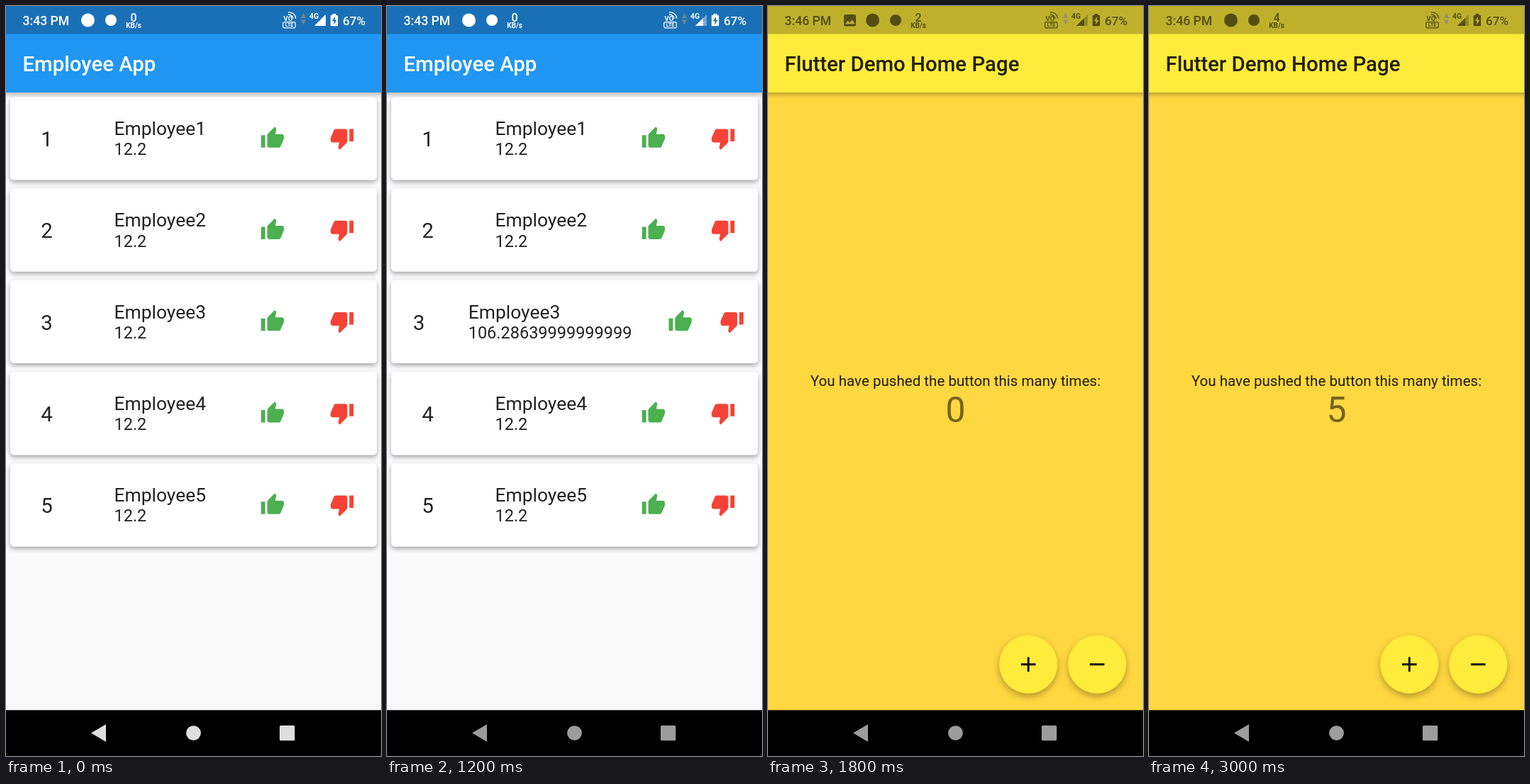
Recreate the animation shown at these times as an HTML page. Size 529 px wide and 1058 px high, loop 3.6 s.

```html
<!DOCTYPE html>
<html lang="en">
<head>
<meta charset="utf-8">
<title>Employee list and counter</title>
<style>
html, body { margin: 0; height: 100%; overflow: hidden; background: #000; }
svg { display: block; width: 529px; height: 1058px; font-family: Roboto, sans-serif; }
.bar { filter: drop-shadow(0 3px 3px rgba(0,0,0,.28)); }
.card { fill: #fff; filter: drop-shadow(0 3px 3px rgba(0,0,0,.34)); }
.fab { fill: #ffeb3b; filter: drop-shadow(0 4px 5px rgba(0,0,0,.3)); }
</style>
</head>
<body>
<svg id="stage" viewBox="0 0 529 1058"></svg>
<script>
const STEP = 600;
const INK = "rgba(0,0,0,.87)";
const THUMB = "M1 21h4V9H1v12zm22-11c0-1.1-.9-2-2-2h-6.31l.95-4.57.03-.32c0-.41-.17-.79-.44-1.06L14.17 1 7.59 7.59C7.22 7.95 7 8.45 7 9v10c0 1.1.9 2 2 2h9c.83 0 1.54-.5 1.84-1.22l3.02-7.05c.09-.23.14-.47.14-.73v-2z";

const blue = { bar: "#2196f3", top: "#1a70b7", body: "#fafafa", ink: "#fff", title: "#fff", name: "Employee App", time: "3:43 PM" };
const yellow = { bar: "#ffeb3b", top: "#bfb02c", body: "#ffd740", ink: "#544d13", title: INK, name: "Flutter Demo Home Page", time: "3:46 PM" };

const states = [
  { look: blue, salary: "12.2", speed: 0, nav: "#dedede", signal: 451 },
  { look: blue, salary: "59.047999999999995", speed: 0 },
  { look: blue, salary: "106.28639999999999", speed: 0 },
  { look: yellow, count: 0, speed: 2, picture: true },
  { look: yellow, count: -4, speed: 0, idle: true },
  { look: yellow, count: 5, speed: 4 },
];

const text = (x, y, size, fill, str, weight = 400, anchor = "start") =>
  `<text x="${x}" y="${y}" font-size="${size}" fill="${fill}" font-weight="${weight}" text-anchor="${anchor}">${str}</text>`;
const rect = (x, y, w, h, fill, r = 0, cls = "") =>
  `<rect x="${x}" y="${y}" width="${w}" height="${h}" rx="${r}" fill="${fill}" class="${cls}"/>`;
const circle = (x, y, r, fill, cls = "") =>
  `<circle cx="${x}" cy="${y}" r="${r}" fill="${fill}" class="${cls}"/>`;
const path = (d, fill, more = "") => `<path d="${d}" fill="${fill}" ${more}/>`;

function thumb(x, y, fill, turn) {
  return path(THUMB, fill, `transform="translate(${x} ${y}) scale(1.469) rotate(${turn}) translate(-12 -12)"`);
}

function card(i, salary) {
  const y = 128.1 + i * 129.26;
  const s = salary.length > 4 ? 12.6 : 0; // spare room given up on each side of an item
  return rect(5.9, y, 517.3, 117.5, "#fff", 5.5, "card") +
    text(57.5 - s, y + 70, 29.4, INK, i + 1, 400, "middle") +
    text(152.5 - 3 * s, y + 54, 26.45, INK, "Employee" + (i + 1)) +
    text(152.5 - 3 * s, y + 82.3, 23.5, INK, salary) +
    thumb(375.9 + 3 * s, y + 58.5, "#4caf50", 0) +
    thumb(474.1 + s, y + 58.5, "#f44336", 180);
}

const list = salary => [0, 1, 2, 3, 4].map(i => card(i, i === 2 ? salary : "12.2")).join("");

function counter(n) {
  return text(264.5, 535.5, 20.57, INK, "You have pushed the button this many times:", 400, "middle") +
    text(264.5, 587.2, 49.96, "rgba(0,0,0,.54)", n, 400, "middle") +
    circle(367.3, 928.8, 41.1, "#ffeb3b", "fab") + circle(464.3, 928.8, 41.1, "#ffeb3b", "fab") +
    path("M357 928.8h20.6M367.3 918.5v20.6M454 928.8h20.6", "none", 'stroke="#111" stroke-width="2.9"');
}

function statusBar({ look, speed, picture, idle, signal = 446 }) {
  const { ink, top } = look;
  const dx = picture ? 32 : 0;
  return rect(0, 0, 529, 39.5, top) +
    text(23.5, 27, 17.63, ink, look.time, 500) +
    (picture ? rect(107, 12, 17, 16.5, ink, 2) + path("M109 25.5l3.6-5 2.8 3.3 3.4-4.6 4 6.3z", top) : "") +
    circle(115.5 + dx, 20, 9.5, ink) + circle(148 + dx, 20, 8, ink) +
    text(180 + dx, 21.5, 16, ink, speed, 500, "middle") +
    text(180 + dx, 31, 10, ink, "KB/s", 700, "middle") +
    text(391.5, 21, 9.5, ink, "VO", 700) +
    path("M398 12q6 0 7 6M398 8.8q10 0 10.7 9", "none", `stroke="${ink}" stroke-width="1.3"`) +
    `<rect x="390.7" y="22.7" width="17.6" height="8.2" rx="2.5" fill="none" stroke="${ink}" stroke-width="1.2"/>` +
    text(399.5, 29.4, 7, ink, "LTE", 700, "middle") +
    path("M419.5 10l3.5 7h-7zM416 19.5h7l-3.5 7z", "#8b8b85", `opacity="${idle ? .25 : .8}"`) +
    text(428, 18, 10.5, ink, "4G", 700) +
    path("M435 28L451 12V28z", ink, 'opacity=".4"') +
    path(`M435 28L${signal} ${463 - signal}V28z`, ink) +
    rect(457.8, 13, 10.4, 15.3, ink, 1) + rect(460.5, 11, 5, 3, ink) +
    path("M464 15l-4 6.3h2.5v5l4-6.6H464z", top) +
    text(475, 26.5, 17.2, ink, "67%", 500);
}

function navBar(fill = "#9c9c9c") {
  return rect(0, 993.3, 529, 65, "#000") +
    path("M120 1025.6L141 1013.3V1038z", fill) +
    circle(264.5, 1025.6, 10.4, fill) + rect(386, 1015, 21.3, 21.3, fill, 1.5);
}

function scene(s) {
  const { look } = s;
  return rect(0, 0, 529, 1058, look.body) +
    (s.salary ? list(s.salary) : counter(s.count)) +
    rect(-10, 0, 549, 122, look.bar, 0, "bar") +
    text(23.5, 92.3, 29.4, look.title, look.name, 500) +
    statusBar(s) + navBar(s.nav);
}

const stage = document.getElementById("stage");
let shown = -1;
function draw() {
  const now = Math.floor(performance.now() / STEP) % states.length;
  if (now !== shown) stage.innerHTML = scene(states[shown = now]);
  requestAnimationFrame(draw);
}
draw();
</script>
</body>
</html>
```
